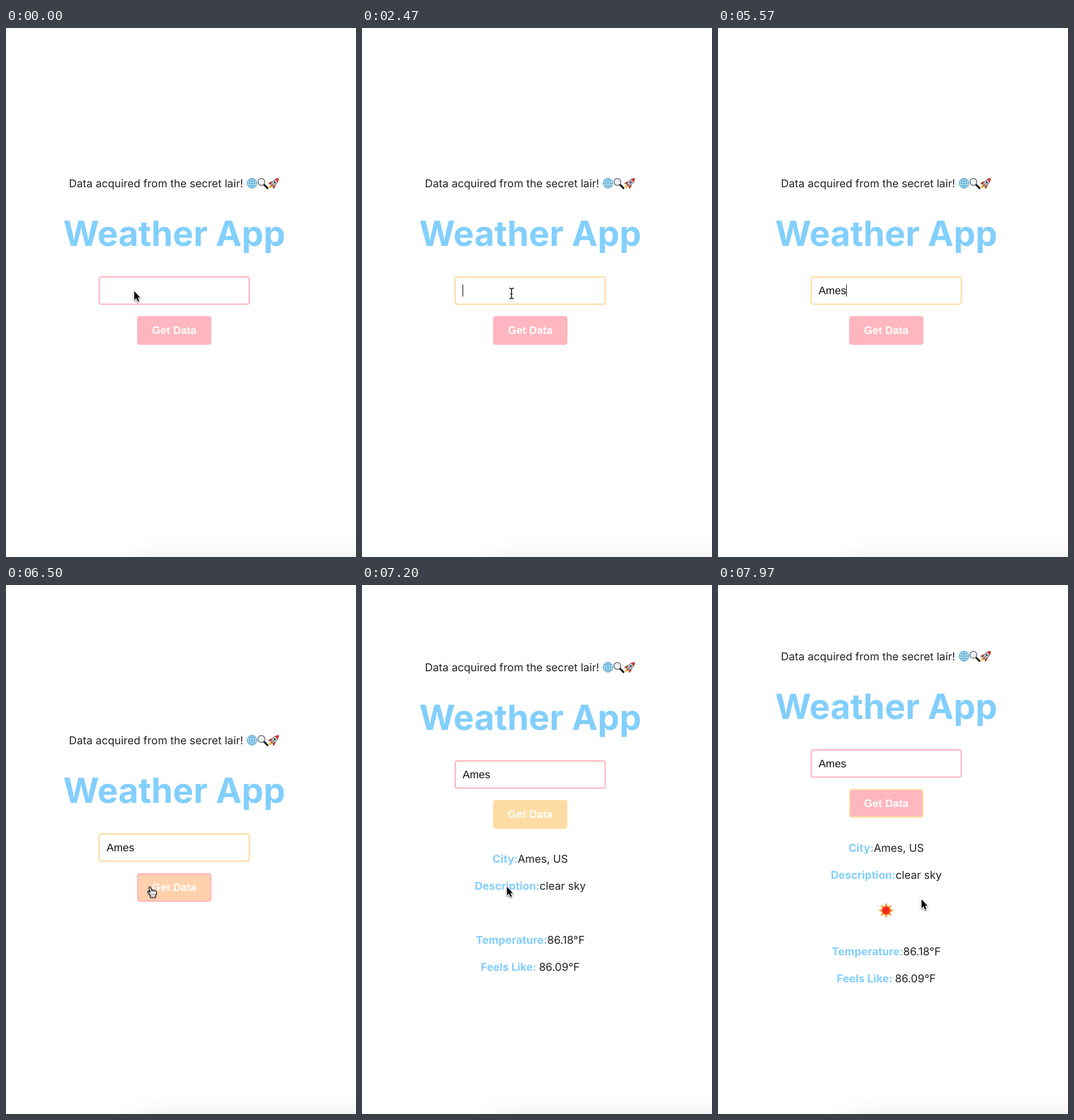
Write an HTML page with a canvas that moves like this. It is 609 px wide and 920 px high and loops after 8000 ms.

```html
<!DOCTYPE html>
<html lang="en">
<head>
<meta charset="utf-8">
<title>Weather App</title>
<style>
  html, body { margin: 0; width: 609px; height: 920px; overflow: hidden; background: #fff; }
  canvas { display: block; }
</style>
</head>
<body>
<canvas id="stage" width="609" height="920"></canvas>
<script>
const ctx = document.getElementById('stage').getContext('2d');
ctx.textRendering = 'geometricPrecision';
const LOOP = 8000, CENTER = 292.75, SIZE = 18.85;
const PINK = [255, 182, 190], YELLOW = [255, 220, 163];
const BLUE = '#82cffd', INK = '#222';
const INTER = 'Inter, sans-serif';
const ARIAL = '"Liberation Sans", Arial, sans-serif';

// Moments of the interaction, in ms
const FOCUS = 1200, HOVER = 6400, CLICK = 6780, RESULT = 7070, LEAVE = 7200, ICON = 7300;
const KEYS = [5100, 5170, 5370, 5570];
const CARET = [[1200, 1700], [2200, 2700], [3170, 3670], [4170, 4670], [5100, 6070], [6570, CLICK]];
const POINTER = [
  [0, 223, 457], [1667, 223, 458], [1700, 245, 458.5], [1733, 255, 458.5], [1800, 262, 458],
  [2230, 262, 458], [2500, 260, 462], [6230, 260, 462], [6480, 252, 524],
  [7540, 252, 524], [7700, 285, 540], [7850, 335, 550], [7970, 354, 546]
];

const clamp = v => Math.max(0, Math.min(1, v));
const mix = (a, b, k) => a + (b - a) * k;
const ease = k => 1 - Math.pow(1 - k, 2.2);
const fade = (t, start, length) => ease(clamp((t - start) / length));
const blend = (a, b, k) => `rgb(${a.map((v, i) => Math.round(mix(v, b[i], k)))})`;

function text(str, x, y, font, color) {
  ctx.font = font;
  ctx.fillStyle = color;
  ctx.fillText(str, x, y);
  return ctx.measureText(str).width;
}

function centered(str, y, font, color) {
  ctx.font = font;
  text(str, CENTER - ctx.measureText(str).width / 2, y, font, color);
}

function labelled(label, value, y) {
  const bold = `700 ${SIZE}px ${INTER}`, plain = `400 ${SIZE}px ${INTER}`;
  ctx.font = bold;
  let width = ctx.measureText(label).width;
  ctx.font = plain;
  width += ctx.measureText(value).width;
  const x = CENTER - width / 2;
  text(value, x + text(label, x, y, bold, BLUE), y, plain, INK);
}

function box(width, y, height, fill, border) {
  ctx.beginPath();
  ctx.roundRect(CENTER - width / 2 + 1.2, y + 1.2, width - 2.4, height - 2.4, 3.5);
  ctx.fillStyle = fill;
  ctx.fill();
  ctx.strokeStyle = border;
  ctx.lineWidth = 2.4;
  ctx.stroke();
}

function disc(x, y, r, fill) {
  ctx.beginPath();
  ctx.arc(x, y, r, 0, 7);
  ctx.fillStyle = fill;
  ctx.fill();
}

function shape(d, fill, stroke, width = 1) {
  const path = new Path2D(d);
  if (fill) { ctx.fillStyle = fill; ctx.fill(path); }
  if (stroke) { ctx.strokeStyle = stroke; ctx.lineWidth = width; ctx.stroke(path); }
}

function at(x, y, draw) {
  ctx.save();
  ctx.translate(x, y);
  draw();
  ctx.restore();
}

function globe() {
  disc(0, 0, 9, '#b4e3fa');
  ctx.strokeStyle = '#4393bd';
  ctx.lineWidth = .8;
  for (const rx of [8.6, 4.3]) {
    ctx.beginPath();
    ctx.ellipse(0, 0, rx, 8.6, 0, 0, 7);
    ctx.stroke();
  }
  shape('M0 -8.6V8.6M-8.6 0H8.6M-7 -4.6Q0 -3 7 -4.6M-7 4.6Q0 3 7 4.6', null, '#4393bd', .8);
}

function magnifier() {
  ctx.lineCap = 'round';
  shape('M2 2L8 8', null, '#1d1d1f', 3.2);
  disc(-2.6, -2.8, 6, '#e9eff2');
  ctx.strokeStyle = '#55595c';
  ctx.lineWidth = 1.3;
  ctx.stroke();
  shape('M-6 -4Q-5 -7 -2 -7', null, '#fff', 1.2);
}

function rocket() {
  ctx.rotate(Math.PI / 4);
  shape('M-2 6Q-3 10 0 12Q3 10 2 6Z', '#f9b233');
  shape('M-3 0L-6 4V8L-2 5ZM3 0L6 4V8L2 5Z', '#d23c2c', '#7c2a24', .6);
  shape('M0 -11Q4 -7 4 -1L2.6 6H-2.6L-4 -1Q-4 -7 0 -11Z', '#c9ced2', '#4a4e52', .9);
  shape('M0 -11.5Q3 -9 3.6 -5.5H-3.6Q-3 -9 0 -11.5Z', '#d5382d');
  disc(0, -1.6, 1.8, '#31475c');
  shape('M0 2V7', null, '#b42d28', 1.5);
}

function sun() {
  for (let i = 0; i < 8; i++) {
    ctx.save();
    ctx.rotate(i * Math.PI / 4);
    shape('M0 -13.5L2.4 -7.5H-2.4Z', '#f79327');
    ctx.restore();
  }
  const glow = ctx.createRadialGradient(0, 0, 2, 0, 0, 8);
  glow.addColorStop(0, '#f0201c');
  glow.addColorStop(.72, '#ef3b1d');
  glow.addColorStop(1, '#fbb13a');
  disc(0, 0, 8, glow);
}

function softShadow(color, blur, dy) {
  ctx.shadowColor = color;
  ctx.shadowBlur = blur;
  ctx.shadowOffsetY = dy;
}

const pointers = {
  arrow() {
    const d = 'M.2 .8V16L3.6 12.8L6.1 18.6L8.7 17.5L6.2 11.8H10.6Z';
    ctx.lineJoin = 'round';
    softShadow('rgba(0,0,0,.4)', 3, 1.5);
    shape(d, '#fff', '#fff', 2.2);
    softShadow('transparent', 0, 0);
    shape(d, '#000');
  },
  beam() {
    const d = 'M-4 -9Q0 -9.5 0 -6V6Q0 9.5 -4 9M4 -9Q0 -9.5 0 -6M0 6Q0 9.5 4 9M-2 1H2';
    shape(d, null, '#fff', 3);
    shape(d, null, '#111', 1.5);
  },
  hand() {
    ctx.lineJoin = 'round';
    softShadow('rgba(0,0,0,.35)', 3, 1.5);
    shape('M-.5 19V16L-5 10.5Q-6 8 -3.5 8.2L-1 10.5L-3.2 3Q-3.4 .8 -1.7 .8Q-.3 .8 .2 2.6L1.5 7' +
      'Q2.5 5.2 4.2 7Q5.6 5.6 6.8 7.5Q9.2 6.7 9.6 9.5V13L8 16.5V19Z', '#fff', '#111', 1.2);
    softShadow('transparent', 0, 0);
    shape('M1.5 7L2 9.5M4.2 7L4.5 9.5M6.8 7.5V9.7M1.6 12.5V16M4 12.5V16M6.3 12.5V16', null, '#111', .7);
  }
};

function pointerAt(t) {
  const i = POINTER.findIndex(key => key[0] > t);
  if (i < 0) return POINTER.at(-1).slice(1);
  const a = POINTER[i - 1], b = POINTER[i], k = (t - a[0]) / (b[0] - a[0]);
  return [mix(a[1], b[1], k), mix(a[2], b[2], k)];
}

function drawPointer(t) {
  if (t >= KEYS[0] && t < 6230) return;
  const [x, y] = pointerAt(t);
  let kind = 'arrow';
  if (t >= FOCUS && t < RESULT) kind = y < 481 ? 'beam' : y > 501 ? 'hand' : 'arrow';
  at(x, y, pointers[kind]);
}

function bottomShade() {
  ctx.save();
  softShadow('rgba(0,0,0,.16)', 50, 0);
  ctx.fillStyle = '#fff';
  ctx.fillRect(228, 936, 600, 300);
  ctx.restore();
}

function drawForm(t) {
  text('Data acquired from the secret lair!', 109.6, 277.3, `400 ${SIZE}px ${INTER}`, INK);
  at(428, 270, globe);
  at(447, 270.5, magnifier);
  at(466.5, 269.5, rocket);
  centered('Weather App', 379.4, `700 ${SIZE * 3.2}px ${INTER}`, BLUE);

  const focused = clamp((t - FOCUS) / 40) - clamp((t - CLICK) / 40);
  box(263.4, 431.8, 49.8, '#fff', blend(PINK, YELLOW, focused));
  const typed = 'Ames'.slice(0, KEYS.filter(k => t >= k).length);
  const width = text(typed, 175, 463, `${SIZE}px ${ARIAL}`, '#111');
  if (CARET.some(([on, off]) => t >= on && t < off)) {
    ctx.fillStyle = '#000';
    ctx.fillRect(Math.round(175 + width), 446, 1, 21);
  }

  const hover = fade(t, HOVER, 250) - fade(t, LEAVE, 240);
  box(129.4, 501, 50, blend(PINK, YELLOW, hover), blend(PINK, YELLOW, fade(t, CLICK, 250)));
  centered('Get Data', 532.3, `700 ${SIZE}px ${ARIAL}`, '#fff');
}

function drawResult(hasIcon) {
  const shift = hasIcon ? 19.3 : 0;
  labelled('City:', 'Ames, US', 483.3 - shift);
  labelled('Description:', 'clear sky', 530.3 - shift);
  if (hasIcon) at(292.5, 566, sun);
  labelled('Temperature:', '86.18°F', 624.3 + shift);
  labelled('Feels Like: ', '86.09°F', 671.3 + shift);
}

function render(t) {
  ctx.fillStyle = '#fff';
  ctx.fillRect(0, 0, 609, 920);
  bottomShade();
  const lift = t >= ICON ? -146.3 : t >= RESULT ? -127 : 0;
  at(0, lift, () => drawForm(t));
  if (t >= RESULT) drawResult(t >= ICON);
  drawPointer(t);
}

const start = performance.now();
function tick() {
  render((performance.now() - start) % LOOP);
  requestAnimationFrame(tick);
}
tick();
</script>
</body>
</html>
```
